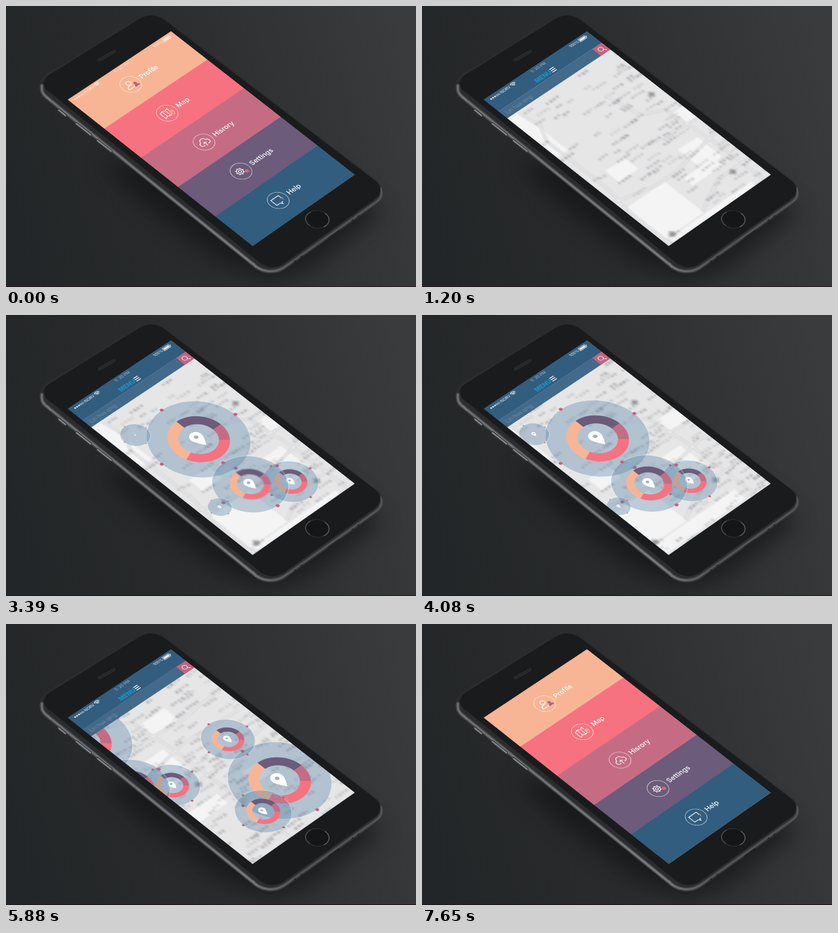
Animation of 698x480 px, one loop 7680 ms. Source, as an HTML page with a canvas:

```html
<!DOCTYPE html>
<html lang="en">
<head>
<meta charset="utf-8">
<title>Phone menu and map</title>
<style>
html, body { margin: 0; width: 100%; height: 100%; overflow: hidden; background: #2a2c2d; }
canvas { position: absolute; left: 0; top: 0; transform-origin: 0 0; }
</style>
</head>
<body>
<canvas id="stage" width="698" height="480"></canvas>
<canvas id="screen" width="300" height="534"></canvas>
<script>
const LOOP = 7680, W = 375, H = 667, SCALE = 0.8, BAND = H / 5, TAU = Math.PI * 2;
const COLORS = ['#f8b595', '#f67280', '#c56c84', '#6c5b7b', '#325d7f'];
const LABELS = ['Profile', 'Map', 'Hisrory', 'Settings', 'Help'];
const FONT = 'Inter, "Liberation Sans", sans-serif';
const PAN = { x: 217, y: 212 };

const stage = document.getElementById('stage').getContext('2d');
const screen = document.getElementById('screen');
const g = screen.getContext('2d');

const clamp = v => Math.max(0, Math.min(1, v));
const span = (t, start, dur) => clamp((t - start) / dur);
const inOut = p => p < 0.5 ? 4 * p ** 3 : 1 - 4 * (1 - p) ** 3;
const out = p => 1 - (1 - p) ** 3;

// Perspective from the flat screen to its four corners on the stage
const view = (() => {
  const [[x0, y0], [x1, y1], [x2, y2], [x3, y3]] = [[105, 160], [281, 43], [594, 288], [420, 410]];
  const ax = x1 - x2, ay = y1 - y2, bx = x3 - x2, by = y3 - y2;
  const sx = x0 - x1 + x2 - x3, sy = y0 - y1 + y2 - y3, den = ax * by - bx * ay;
  const p = (sx * by - bx * sy) / den, q = (ax * sy - sx * ay) / den;
  return { a: x1 - x0 + p * x1, b: x3 - x0 + q * x3, c: x0, d: y1 - y0 + p * y1, e: y3 - y0 + q * y3, f: y0, p, q };
})();
{
  const { a, b, c, d, e, f, p, q } = view, w = W * SCALE, h = H * SCALE;
  screen.style.transform = `matrix3d(${[a / w, d / w, 0, p / w, b / h, e / h, 0, q / h, 0, 0, 1, 0, c, f, 0, 1].join()})`;
}
function toScreen(X, Y) {
  const { a, b, c, d, e, f, p, q } = view;
  const m = a - p * X, n = b - q * X, r = d - p * Y, s = e - q * Y, det = m * s - n * r;
  return [W * ((X - c) * s - n * (Y - f)) / det, H * (m * (Y - f) - r * (X - c)) / det];
}

function disc(c, x, y, r) {
  c.beginPath();
  c.arc(x, y, r, 0, TAU);
}
function lines(c, ...pts) {
  c.beginPath();
  for (let i = 0; i < pts.length; i += 2) c.lineTo(pts[i], pts[i + 1]);
}
function write(str, x, y, size, color, weight = 400, align = 'left') {
  g.font = `${weight} ${size}px ${FONT}`;
  g.textAlign = align;
  g.textBaseline = 'middle';
  g.fillStyle = color;
  g.fillText(str, x, y);
}

// Vertical motion blur made of faint copies
function smear(length, draw) {
  if (Math.abs(length) < 4) return draw();
  const n = 10;
  for (let k = 0; k < n; k++) {
    g.save();
    g.globalAlpha = 0.17;
    g.translate(0, (k / (n - 1) - 0.5) * length);
    draw();
    g.restore();
  }
}

function drawPhone(c) {
  const bg = c.createLinearGradient(0, 330, 698, 130);
  bg.addColorStop(0, '#232628');
  bg.addColorStop(0.4, '#292b2c');
  bg.addColorStop(1, '#3a3b3c');
  c.fillStyle = bg;
  c.fillRect(0, 0, 698, 480);

  c.save();
  c.filter = 'blur(18px)';
  c.fillStyle = 'rgba(12,13,14,0.55)';
  lines(c, 160, 265, 230, 335, 370, 440, 450, 468, 520, 445, 640, 355, 560, 280);
  c.fill();
  c.restore();

  const body = new Path2D('M58 140C56 130 60 122 72 114L225 20C240 12 256 12 272 23L630 298C645 309 645 328 632 339L475 450C462 459 442 460 427 450L72 162C62 156 59 150 58 140Z');
  const rim = new Path2D('M61 136C60 148 64 152 73 159L427 446C442 456 460 455 474 446L630 335C640 328 641 320 638 312');
  const face = new Path2D('M66 138C62 130 65 123 76 116L227 22C240 14 256 14 270 24L628 298C641 309 640 320 628 330L473 440C460 448 446 448 433 439L78 150C72 146 68 143 66 138Z');
  const metal = (left, middle, right) => {
    const grad = c.createLinearGradient(60, 0, 640, 0);
    grad.addColorStop(0, left);
    grad.addColorStop(0.6, middle);
    grad.addColorStop(0.75, right);
    grad.addColorStop(1, right);
    return grad;
  };
  c.lineCap = c.lineJoin = 'round';
  c.fillStyle = '#2b2c2e';
  c.fill(body);
  for (const [width, color] of [
    [7, metal('#3f4042', '#434446', '#343537')],
    [4.5, metal('#56585b', '#5f6063', '#454648')],
    [2, metal('#727477', '#808285', '#57585b')]
  ]) {
    c.lineWidth = width;
    c.strokeStyle = color;
    c.stroke(rim);
  }
  c.fillStyle = '#1a1b1d';
  c.fill(face);

  for (const [x, y, x2, y2] of [[90, 178, 101, 187], [120, 201, 144, 220], [156, 230, 179, 248]]) {
    c.strokeStyle = '#3c3d40';
    c.lineWidth = 5;
    lines(c, x, y, x2, y2);
    c.stroke();
    c.strokeStyle = '#8d8f92';
    c.lineWidth = 2.2;
    c.stroke();
  }
  c.strokeStyle = '#77797c';
  c.lineWidth = 2;
  lines(c, 71, 156, 75, 162);
  c.stroke();
  lines(c, 421, 439, 425, 446);
  c.stroke();

  c.strokeStyle = '#303133';
  c.lineWidth = 5;
  lines(c, 159, 92, 184, 78);
  c.stroke();
  c.strokeStyle = '#252628';
  c.lineWidth = 3;
  c.stroke();

  c.lineWidth = 1.6;
  c.fillStyle = '#151618';
  const homeArc = (from, to, color) => {
    c.strokeStyle = color;
    c.beginPath();
    c.ellipse(530, 364.5, 20, 14.5, 0.1, from, to);
    c.stroke();
  };
  homeArc(0, TAU, '#343537');
  c.fill();
  homeArc(-0.9, 0.9, '#5a5b5d');
  homeArc(2.2, 4, '#4c4d4f');

  c.strokeStyle = '#222325';
  c.lineWidth = 2.5;
  lines(c, 549, 397, 567, 384);
  c.stroke();
  c.fillStyle = '#222325';
  for (const [x, y] of [[492, 436], [503, 428], [590, 366], [600, 359]]) {
    disc(c, x, y, 1.6);
    c.fill();
  }
  c.fillStyle = '#1f1119';
  c.fillRect(0, 479, 698, 1);
}

function makeMap() {
  const cv = document.createElement('canvas');
  cv.width = W + PAN.x;
  cv.height = H + PAN.y;
  const c = cv.getContext('2d');
  let seed = 17;
  const rnd = () => (seed = (seed * 16807) % 2147483647) / 2147483647;
  c.fillStyle = '#e6e6e7';
  c.fillRect(0, 0, cv.width, cv.height);
  c.filter = 'blur(2px)';
  c.fillStyle = '#f4f4f4';
  for (const [x, y, w, h] of [[10, 505, 140, 140], [0, 86, 40, 180], [195, 528, 110, 34], [60, 380, 70, 50],
    [255, 450, 70, 90], [340, 350, 90, 50], [20, 650, 300, 40], [420, 640, 60, 50]]) c.fillRect(x, y, w, h);

  const road = (color, width, ...pts) => {
    c.strokeStyle = color;
    c.lineWidth = width;
    lines(c, ...pts);
    c.stroke();
  };
  for (const [color, width] of [['#cdcdd0', 7], ['#f0f0f0', 4]]) {
    road(color, width, 34, 90, 45, 160, 20, 210, 22, 420, 8, 520, 8, 700, 60, 880);
    road(color, width, 0, 470, 120, 500, 190, 500, 375, 470, 594, 480);
    road(color, width, 250, 210, 270, 300, 330, 330, 345, 470, 355, 880);
    road(color, width, 150, 640, 260, 590, 375, 590, 594, 560);
    road(color, width, 220, 390, 430, 410, 594, 395);
  }
  c.filter = 'blur(2.6px)';
  // Blurred place labels
  for (let i = 0; i < 300; i++) {
    const x = rnd() * cv.width, y = 92 + rnd() * (cv.height - 92), n = 2 + Math.floor(rnd() * 3);
    if (x < 160 && y > 490 && y < 650 && rnd() < 0.85) continue;
    c.fillStyle = `rgba(80,80,86,${0.12 + rnd() * 0.2})`;
    for (let k = 0; k < n; k++) c.fillRect(x + k * 12, y, 6 + rnd() * 3, 6 + rnd() * 4);
  }
  c.fillStyle = 'rgba(70,70,75,0.3)';
  for (const [x, y] of [[342, 268], [36, 643], [307, 596]]) {
    c.fillRect(x - 11, y - 5, 22, 10);
    c.fillRect(x - 4, y - 11, 9, 22);
  }
  return cv;
}

// Stage centre, radius, start of circle, start of ring, start of pin, placed after the pan
const spots = [
  [328, 212, 134, 1300, 2400, 2300],
  [485, 284.5, 71, 1845, 2750, 2650],
  [416, 289, 98, 2050, 3150, 2850],
  [220, 205, 39, 2200, 0, 3330],
  [364, 328, 31, 2500, 0, 2900],
  [466, 267, 134, 4330, 4980, 4700, 1],
  [378, 197, 70, 4330, 5180, 5000, 1],
  [438, 320, 73, 4380, 5080, 4900, 1]
].map(([X, Y, r, born, ring, pin, late]) => {
  const [x, y] = toScreen(X, Y);
  return { x: x + (late ? PAN.x : 0), y: y + (late ? PAN.y : 0), r, born, ring, pin };
});

function drawRing(r, s) {
  const mid = r * 0.495 * s, deg = Math.PI / 180;
  g.save();
  if (s < 0.98) g.filter = `blur(${Math.min(3, (1 - s) * 18)}px)`;
  g.globalAlpha = Math.min(1, s * 1.2);
  g.lineWidth = r * 0.21 * s;
  [[-90, 0, 3], [0, 43, 2], [43, 158, 1], [158, 270, 0]].forEach(([from, to, color]) => {
    g.strokeStyle = COLORS[color];
    g.beginPath();
    g.arc(0, 0, mid, from * deg, to * deg);
    g.stroke();
  });
  g.restore();
}

function drawPin(k) {
  g.save();
  g.scale(k, k);
  g.fillStyle = '#fff';
  g.beginPath();
  g.arc(0, -9, 18, Math.PI * 0.9, Math.PI * 0.1);
  g.quadraticCurveTo(13, 10, 0, 27);
  g.quadraticCurveTo(-13, 10, -17.1, -3.4);
  g.fill();
  g.fillStyle = '#9fb0c1';
  disc(g, 0, -9, 6);
  g.fill();
  g.restore();
}

function drawSpot(o, t) {
  const p = span(t, o.born, 450);
  if (!p) return;
  const s = out(p), r = o.r * s;
  g.save();
  g.translate(o.x, o.y);
  g.globalAlpha = Math.min(1, p * 3);
  g.fillStyle = 'rgba(88,130,166,0.36)';
  g.strokeStyle = 'rgba(255,255,255,0.5)';
  g.lineWidth = 1.4;
  disc(g, 0, 0, r);
  g.fill();
  g.stroke();
  g.globalAlpha = clamp(p * 2 - 0.5);
  g.fillStyle = '#c4627e';
  const size = o.r > 90 ? 5 : o.r > 50 ? 3.4 : 1.6;
  for (const [x, y] of [[0, -1], [1, 0], [0, 1], [-1, 0]]) {
    disc(g, x * r, y * r, size);
    g.fill();
  }
  g.globalAlpha = 1;
  const ring = o.ring ? out(span(t, o.ring, 450)) : 0;
  if (ring) drawRing(o.r, ring);
  const pin = out(span(t, o.pin, 450));
  if (pin) drawPin(pin * o.r / 133);
  g.restore();
}

function statusBar(alpha) {
  g.save();
  g.globalAlpha *= alpha;
  g.fillStyle = g.strokeStyle = '#fff';
  g.lineWidth = 1.2;
  for (let i = 0; i < 5; i++) {
    disc(g, 16 + i * 7, 11, 2.5);
    i < 3 ? g.fill() : g.stroke();
  }
  write('NORV', 50, 11.5, 12, '#fff');
  g.lineWidth = 2;
  for (const r of [4, 8, 12]) {
    g.beginPath();
    g.arc(96, 17, r, -Math.PI * 0.75, -Math.PI * 0.25);
    g.stroke();
  }
  write('100%', 301, 11.5, 12, '#fff');
  g.lineWidth = 1.4;
  g.strokeRect(335, 6.5, 23, 10);
  g.fillRect(337, 8.5, 19, 6);
  g.fillRect(359.5, 9.5, 2, 4);
  g.globalAlpha *= 0.6;
  write('5: 20 PM', 187, 10, 12, '#fff', 400, 'center');
  g.restore();
}

function header(blur) {
  g.fillStyle = COLORS[4];
  g.fillRect(0, 0, W, 54);
  g.fillStyle = '#43698b';
  g.fillRect(0, 54, W, 32);
  g.fillStyle = '#c5637f';
  g.fillRect(340, 54, 35, 32);
  smear(blur, () => {
    statusBar(0.95);
    write('MENU', 146, 42, 18, '#1b94c6', 800);
    g.fillStyle = '#fff';
    for (let i = 0; i < 3; i++) g.fillRect(203, 33 + i * 6, 15, 2.4);
    write('Lin hua qing', 11, 71, 16, 'rgba(190,210,228,0.45)', 300);
    g.strokeStyle = '#fff';
    g.lineWidth = 1.6;
    disc(g, 356, 69, 7);
    g.stroke();
    lines(g, 361, 74, 367, 80);
    g.stroke();
  });
}

const mapImage = makeMap();
function mapPage(t, y, blur) {
  const p = inOut(span(t, 3850, 700));
  g.save();
  g.translate(0, y);
  g.beginPath();
  g.rect(0, 0, W, H);
  g.clip();
  g.save();
  g.translate(-PAN.x * p, -PAN.y * p);
  g.drawImage(mapImage, 0, 0);
  for (const o of spots) drawSpot(o, t);
  g.restore();
  header(blur);
  g.restore();
}

function gear(x, y, r) {
  disc(g, x, y, r);
  g.stroke();
  disc(g, x, y, r * 0.45);
  g.stroke();
  for (let k = 0; k < 8; k++) {
    const c = Math.cos(k * TAU / 8), s = Math.sin(k * TAU / 8);
    lines(g, x + c * r, y + s * r, x + c * r * 1.4, y + s * r * 1.4);
    g.stroke();
  }
}

const icons = [
  () => {
    disc(g, -2, -6, 7);
    g.stroke();
    g.stroke(new Path2D('M-6 1C-16 4-16 8-16 12H5'));
    g.fillStyle = '#b5627e';
    disc(g, 12, 4, 4.5);
    g.fill();
    g.fill(new Path2D('M4 15C4 9 8 8 12 8S20 9 20 15Z'));
  },
  () => {
    g.stroke(new Path2D('M-16-9L-7-13L2-9L10-13V-4M-16-9V12L-7 8L2 12L7 10M-7-13V8M2-9V12'));
    g.strokeStyle = '#fbc49f';
    g.stroke(new Path2D('M13 14C5 5 8-1 13-1S21 5 13 14Z'));
    disc(g, 13, 4, 1.5);
    g.stroke();
  },
  () => {
    g.stroke(new Path2D('M-5 10H-9C-18 9-17-2-9-3C-8-15 8-15 10-4C18-3 18 9 10 10H6M0 15V1M-5 5L0 0L5 5'));
  },
  () => {
    gear(-3, -1, 9);
    g.strokeStyle = '#ec6a7c';
    gear(12, 9, 4);
  },
  () => {
    g.stroke(new Path2D('M12-2V-12H-15V10H-3L2 16V10H7'));
    write('?', 9, 4, 14, '#f8b595', 500);
  }
];

function menuItem(i, x, y) {
  g.save();
  g.translate(x, y);
  g.strokeStyle = 'rgba(255,255,255,0.8)';
  g.lineWidth = 1.3;
  disc(g, 161, 0, 28);
  g.stroke();
  write(LABELS[i], 197, 0, 20, '#fff', 500);
  g.translate(161, 0);
  g.strokeStyle = '#fff';
  g.lineWidth = 2;
  g.lineJoin = 'round';
  icons[i]();
  g.restore();
}

function menuPage(y, blur) {
  g.save();
  g.translate(0, y);
  COLORS.forEach((color, i) => {
    g.fillStyle = color;
    g.fillRect(0, i * BAND, W, BAND + 1);
  });
  smear(blur, () => {
    statusBar(0.75);
    LABELS.forEach((_, i) => menuItem(i, 0, (i + 0.5) * BAND));
  });
  g.restore();
}

// Panels drop from the top one by one, each in front of the last
function dropMenu(t) {
  for (let i = 4; i >= 0; i--) {
    const start = 5860 + (4 - i) * 270;
    if (t < start - 45) continue;
    g.fillStyle = COLORS[i];
    g.fillRect(0, 0, W, (i + 1) * BAND * inOut(span(t, start, 500)));
    const iconY = time => -90 + ((i + 0.5) * BAND + 90) * inOut(span(time, start - 45, 500));
    smear(iconY(t + 12) - iconY(t - 12), () => menuItem(i, (i - 2) * 3.5, iconY(t)));
  }
}

function render(t) {
  g.setTransform(SCALE, 0, 0, SCALE, 0, 0);
  g.clearRect(0, 0, W, H + 1);
  const scroll = time => H * inOut(span(time, 330, 900));
  const y = scroll(t), blur = scroll(t + 12) - scroll(t - 12);
  if (y < H) menuPage(-y, blur);
  if (y > 0) mapPage(t, H - y, blur);
  dropMenu(t);
}

drawPhone(stage);
const begin = performance.now();
function tick() {
  render((performance.now() - begin) % LOOP);
  requestAnimationFrame(tick);
}
tick();
</script>
</body>
</html>
```
